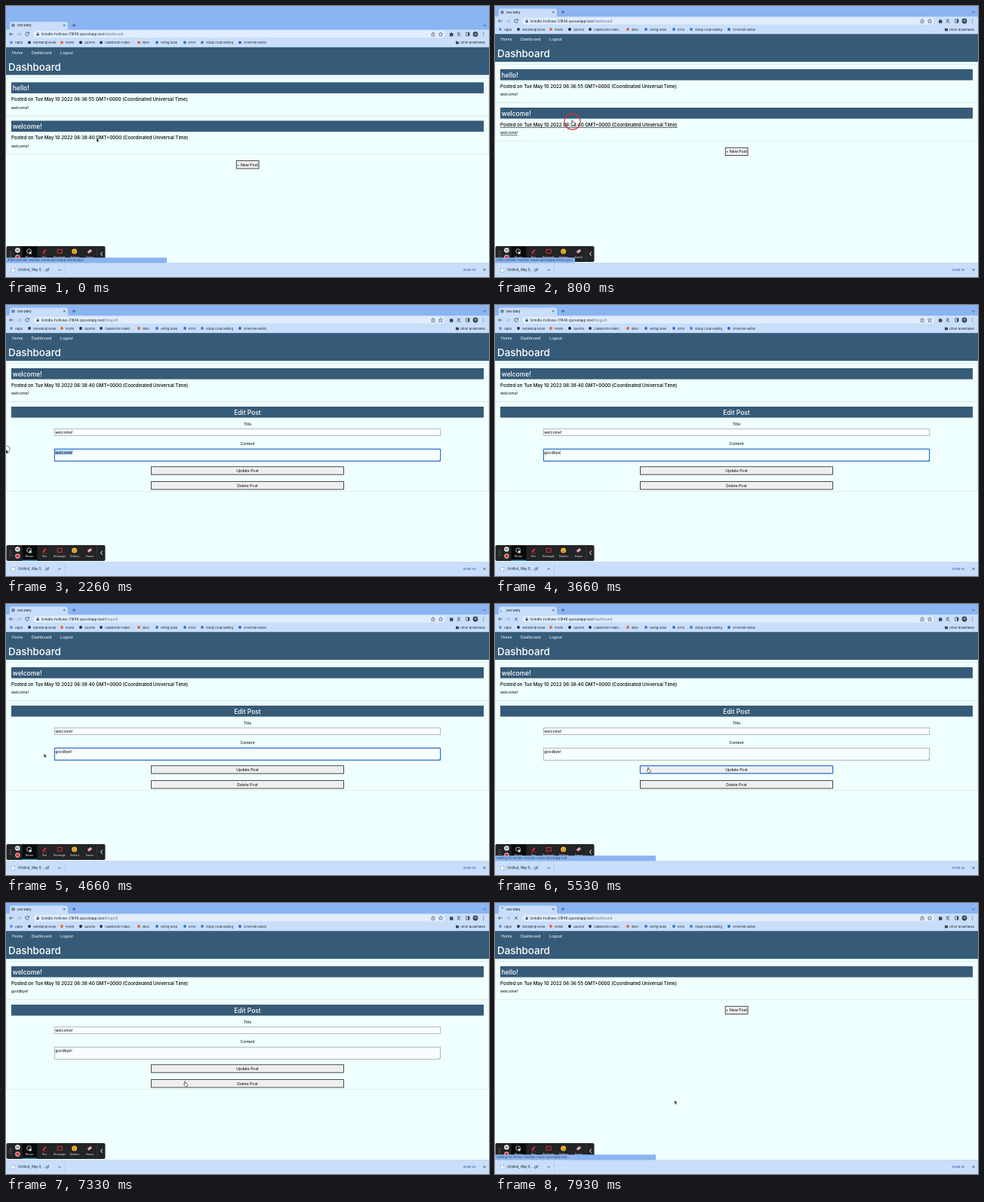
These frames come from a looping animation (640 px wide and 360 px high, 8 s). An HTML page:

```html
<!DOCTYPE html>
<html lang="en">
<head>
<meta charset="utf-8">
<title>Dashboard</title>
<style>
html, body { margin: 0; width: 100%; height: 100%; overflow: hidden; background: #f0ffff; }
svg { display: block; width: 640px; height: 360px; font-family: Inter, "Open Sans", sans-serif; }
text { white-space: pre; }
</style>
</head>
<body>
<svg id="stage" viewBox="0 0 640 360"></svg>
<script>
const LOOP = 8000;
const NAVY = '#365b78', FRAME = '#8ab4f2', BAR = '#c8defa', INK = '#3c4655', PAGE = '#f0ffff';
const HOST = 'brindle-hollows-31846.quovelapp.test';
const stage = document.getElementById('stage');

const rect = (x, y, w, h, fill, more = '') =>
  `<rect x="${x}" y="${y}" width="${w}" height="${h}" fill="${fill}" ${more}/>`;
const dot = (x, y, r, fill, more = '') => `<circle cx="${x}" cy="${y}" r="${r}" fill="${fill}" ${more}/>`;
const line = (d, color = INK, w = 0.8, more = '') =>
  `<path d="${d}" fill="none" stroke="${color}" stroke-width="${w}" ${more}/>`;
// y is the middle of the capitals
const text = (x, y, size, str, more = '') =>
  `<text x="${x}" y="${y + size * 0.36}" font-size="${size}" ${more}>${str}</text>`;
const mid = (y, size, str, more = '') => text(320, y, size, str, 'text-anchor="middle" ' + more);
const cross = (x, y, r) => line(`M${x - r} ${y - r}l${2 * r} ${2 * r}m0 ${-2 * r}l${-2 * r} ${2 * r}`);
const within = (t, a, b) => t >= a && t < b;
const ease = p => { p = Math.min(1, Math.max(0, p)); return p * p * (3 - 2 * p); };

// ---- browser chrome ----
const BOOKMARKS = [
  [12, 'Apps', '#5b8def'], [36, 'Workshop Nook', '#26324a'], [79, 'Plovix', '#e8662c'],
  [104, 'Quorno', '#1b1f23'], [131, 'Classroom Folder...', '#26324a'], [181, 'libvo', '#d9643a'],
  [205, 'Hiring Desk', '#3472c8'], [242, 'Error', '#3472c8'], [265, 'Study Code Mixing', '#4a78b8'],
  [315, 'STARTER Notes', '#2c63c4']
];

function chrome(path, loading, t) {
  const a = t * 0.36;
  let s = rect(0, -20, 640, 35, FRAME) + rect(0, 14, 640, 23.2, BAR) +
    `<path d="M2 14.5q3 0 3-3v-5q0-3 3-3h71q3 0 3 3v5q0 3 3 3z" fill="${BAR}"/>` +
    text(15, 8.2, 4, 'Dev Diary') + cross(77.3, 8.2, 1.2) + line('M90 6v4.4m-2.2-2.2h4.4') +
    line('M632.4 7.4l1.8 1.8 1.8-1.8');
  s += loading
    ? line('M9.5 5.9a2.3 2.3 0 0 1 2.3 2.3', '#2b6fd6', 0.8, `transform="rotate(${a} 9.5 8.2)"`) + cross(28, 20, 1.8)
    : dot(9.5, 8.2, 2.2, '#536579') + line('M7.4 8.2h4.2M9.5 6v4.4', BAR, 0.4) +
      line('M30 18.6a2.3 2.3 0 1 0 .2 2M30.4 17.3v1.7h-1.7');
  s += line('M9.7 20h-5m2-2.2L4.5 20l2.2 2.2') + line('M14.7 20h5m-2-2.2l2.2 2.2-2.2 2.2', '#8ea4bf') +
    rect(36, 15.4, 546, 9.2, '#e1edfd', 'rx="4.6"') +
    rect(40.6, 19.5, 3, 2.4, INK, 'rx=".4"') + line('M41.2 19.6v-.8a.9.9 0 0 1 1.8 0v.8', INK, 0.5) +
    text(47, 20, 4.65, `${HOST}<tspan fill="#66758a">${path}</tspan>`, 'fill="#1d2530"') +
    line('M564.8 19h-.8v3.4h4V19h-.8M566 21v-3.6m-1.2 1.2l1.2-1.2 1.2 1.2', INK, 0.6) +
    line('M576 17.3l.8 1.8 2 .2-1.5 1.3.4 2-1.7-1-1.7 1 .4-2-1.5-1.3 2-.2z', INK, 0.6) +
    `<path d="M588 18.6h1.2a1 1 0 0 1 1.9 0h1.2v1.3a1 1 0 0 1 0 1.7v1.2H588z" fill="${INK}"/>` +
    line('M598 18.4h4m-4 1.7h3m-3 1.7h2m1.6-1v2') +
    rect(609.6, 17.8, 4.4, 4.4, 'none', `rx=".5" stroke="${INK}" stroke-width=".7"`) +
    rect(612, 17.8, 2, 4.4, INK) +
    dot(622, 20, 3.4, '#34454f') + text(622, 20, 3.4, 'M', 'fill="#fff" text-anchor="middle"') +
    [18, 20, 22].map(y => dot(632.5, y, 0.5, INK)).join('');
  for (const [x, name, color] of BOOKMARKS)
    s += dot(x - 5, 31, 1.9, color) + text(x, 31.2, 4, name, 'fill="#1d2530"');
  return s + `<path d="M596 29.4h1.6l.5.6h2v3.2H596z" fill="${INK}"/>` + text(602, 31.2, 4, 'Other Bookmarks', 'fill="#1d2530"');
}

// ---- web page ----
const header = () => rect(0, 37, 640, 37.2, NAVY) +
  text(8, 44.5, 5.15, 'Home', 'fill="#fff"') + text(34, 44.5, 5.15, 'Dashboard', 'fill="#fff"') +
  text(72, 44.5, 5.15, 'Logout', 'fill="#fff"') +
  text(3, 63.4, 13.4, 'Dashboard', 'fill="#fff" font-weight="500"');

const card = (y, h) => rect(0.25, y, 639.5, h, 'none', 'stroke="#cfdfe2" stroke-width=".5"') +
  rect(7, y + 6.2, 626, 14.6, NAVY);

function post(y, title, time, body, hover) {
  const deco = hover ? 'text-decoration="underline"' : '';
  return card(y, 50.8) +
    text(8.8, y + 13.7, 8.45, title, 'fill="#fff" font-weight="500"') +
    text(7, y + 28.9, 6.18, `Posted on Tue May 10 2022 ${time} GMT+0000 (Coordinated Universal Time)`, 'font-weight="500" ' + deco) +
    text(7, y + 39.8, 5.1, body, deco);
}

const button = (x, y, w, label, focus) =>
  rect(x, y, w, 10.4, '#efefef', focus ? 'stroke="#2d6fd2" stroke-width="1.2" rx=".6"' : 'stroke="#222" stroke-width=".8"') +
  mid(y + 5.3, 5.1, label);

function dashboard(body, hover) {
  const n = body ? 2 : 1;
  return post(77.8, 'hello!', '06:36:55', 'welcome!') +
    (body ? post(128.8, 'welcome!', '06:38:40', body, hover) : '') +
    button(305.2, 137.2 + (n - 1) * 51, 29.8, '+ New Post');
}

function editor(body, form) {
  const area = form.focus ? 'stroke="#2d6fd2" stroke-width="1.2" rx=".6"' : 'stroke="#858c90" stroke-width=".6"';
  return post(77.8, 'welcome!', '06:38:40', body) + card(128.8, 118.6) +
    mid(142.7, 8.45, 'Edit Post', 'fill="#fff" font-weight="500"') +
    mid(157.8, 5.1, 'Title') +
    rect(64.2, 164.8, 511.6, 8.8, '#fafeff', 'stroke="#858c90" stroke-width=".6"') + text(65.2, 169.2, 5.1, 'welcome!') +
    mid(184.4, 5.1, 'Content') +
    rect(64.4, 191.4, 511.2, 16, '#f7feff', area) + line('M573 207l2.4-2.4m-1 2.4l1-1', '#777', 0.4) +
    (form.selectFrom < 88 ? rect(form.selectFrom, 192.8, 88 - form.selectFrom, 6, '#a3cbf5') : '') +
    text(65.2, 195.7, 5.1, form.value + (form.caret ? '<tspan font-weight="300" dx="-.8">|</tspan>' : '')) +
    button(192.4, 214.8, 255.2, 'Update Post', form.update) +
    button(192.4, 234.6, 255.2, 'Delete Post', form.remove);
}

// ---- fixed parts at the bottom ----
const TOOLS = [['Mouse', 31], ['Pen', 51], ['Rectangle', 71], ['Stickers', 91], ['Eraser', 111]];
const recorder = rect(0.5, 319, 131, 21, '#222426', 'rx="2"') + rect(21.5, 319.5, 20, 20, '#08090a') +
  rect(21.5, 338.6, 20, 1.2, '#2b9cf0') +
  [326.5, 329.5, 332.5].map(y => dot(5.2, y, 0.5, '#aaa') + dot(7, y, 0.5, '#aaa')).join('') +
  dot(15.4, 324.4, 3.2, '#f4f4f4') + line('M14.5 323v2.8m1.8-2.8v2.8', '#222', 0.8) +
  dot(15.4, 333.6, 3.1, '#f4f4f4') + dot(15.4, 333.6, 2.4, '#d8302f') +
  dot(30.6, 325.8, 2.9, 'none', 'stroke="#eee" stroke-width=".8"') +
  '<path d="M30.6 325.6l4 3-1.9.3-.9 1.6z" fill="#fff"/>' +
  line('M49 328.5l3.8-4.6', '#e02b33', 2) + line('M48 329.8h6', '#e02b33', 0.5) +
  rect(68.2, 323.4, 6, 5, 'none', 'stroke="#e02b33" stroke-width="1"') +
  dot(90.6, 326, 3.5, '#f5b82e') + dot(89.4, 325.2, 0.5, '#543') + dot(91.8, 325.2, 0.5, '#543') +
  line('M88.8 327q1.8 2 3.6 0', '#543', 0.6) +
  rect(108.2, 324.2, 5.6, 3.4, '#e9a1ad', 'rx=".6" transform="rotate(-35 111 326)"') +
  TOOLS.map(([name, x]) => text(x, 333.4, 3.3, name, 'fill="#eee" text-anchor="middle"')).join('') +
  rect(120.6, 319.5, 0.5, 20, '#4a4d50') + line('M127.6 326.6l-2 2.6 2 2.6', '#fff', 1);

const shelf = rect(0, 341.4, 640, 18.6, BAR) + rect(0, 341.4, 640, 0.4, '#a9c1df') +
  rect(7.8, 348.4, 4, 5, '#fff', 'stroke="#8a97a8" stroke-width=".5"') +
  text(16, 350.8, 4.15, 'Untitled_ May 9,....gif', 'fill="#1d2530"') +
  line('M69.5 351.5l1.6-1.6 1.6 1.6') + rect(78.6, 344.5, 0.4, 12.5, '#97b0d0') +
  text(614, 350.4, 4.1, 'Show All', 'fill="#2458a8" text-anchor="middle"') + cross(634, 350.5, 1.4);

const status = (w, str) => rect(-1, 334.2, w + 1, 7.6, FRAME, 'rx="1"') + text(2, 338, 4, str, `fill="${INK}"`);

// ---- pointer ----
const PATH = [
  [0, 120, 175.5], [150, 120, 175], [650, 102.5, 153.5], [1060, 102.5, 153.5], [1600, 88.5, 196],
  [1750, 88.5, 196], [2200, 0, 192], [4450, 0, 192], [5100, 203, 219], [5650, 203, 219],
  [6400, 73.6, 156.5], [6850, 73.6, 156.5], [7350, 238, 239], [7650, 238, 239], [7900, 238, 262], [LOOP, 238, 262]
];
// click rings: start, end, radius, colour
const RINGS = [
  [700, 950, 10.6, '#d8323a'], [1750, 2330, 5, '#8b8f96'], [5250, 5450, 10.6, '#d8323a'],
  [6520, 6750, 10.6, '#d8323a'], [7480, 7650, 10.6, '#d8323a']
];

function pointerAt(t) {
  const i = PATH.findIndex(k => k[0] > t), [t0, x0, y0] = PATH[i - 1], [t1, x1, y1] = PATH[i];
  const p = ease((t - t0) / (t1 - t0));
  return [x0 + (x1 - x0) * p, y0 + (y1 - y0) * p];
}

function pointer(t, x, y) {
  if (within(t, 2600, 4450)) return '';
  const hand = within(t, 450, 1150) || within(t, 5000, 5750) || within(t, 6200, 6950) || within(t, 7300, 7680);
  let s = '';
  for (const [a, b, r, color] of RINGS)
    if (within(t, a, b)) s += dot(x, y, r * Math.min(1, 0.5 + (t - a) / 140), 'none', `stroke="${color}" stroke-width="1.1"`);
  const shape = hand
    ? '<path d="M-.6-1.6q.7-.7 1.2 0V1l2.2.6q.8.3.6 1.2L3 5H.2L-1.9 2.2q.3-.9 1.3-.2z" fill="#fff" stroke="#222" stroke-width=".6"/>'
    : '<path d="M0 0v5.2l1.2-1.1.8 1.8.9-.4-.8-1.7h1.7z" fill="#111" stroke="#fff" stroke-width=".4"/>';
  return s + `<g transform="translate(${x.toFixed(2)} ${y.toFixed(2)})">${shape}</g>`;
}

// ---- scene ----
function draw(t) {
  const [x, y] = pointerAt(t);
  const shift = 17.4 * (1 - ease((t - 60) / 340));
  const typed = 'goodbye!'.slice(0, Math.max(0, Math.floor((t - 2700) / 150) + 1));
  const second = t >= 6850;
  const editing = within(t, 1000, 5650) || within(t, 6850, 7730);
  const loading = within(t, 5350, 5720) || t >= 7600;
  const onDash = !editing || loading;

  const page = editing
    ? editor(second ? 'goodbye!' : 'welcome!', {
        value: second ? 'goodbye!' : typed || 'welcome!',
        focus: within(t, 1750, 5250),
        caret: within(t, 2700, 5250) && (t < 3900 || t % 1000 < 500),
        selectFrom: within(t, 1750, 2700) ? Math.max(65, x) : 88,
        update: within(t, 5250, 5650),
        remove: within(t, 7480, 7730)
      })
    : dashboard(t < 1000 ? 'welcome!' : t < 7000 ? 'goodbye!' : '', within(t, 450, 1000) || within(t, 6300, 6850));

  let bubble = '';
  if (t < 1000) bubble = status(t < 400 ? 213 : 106, `https://${HOST}/blogs/6`);
  else if (loading) bubble = status(213, `Waiting for ${HOST}...`);

  return rect(0, 0, 640, 360, PAGE) +
    `<g transform="translate(0 ${shift.toFixed(2)})">${page}${header()}${chrome(onDash ? '/dashboard' : '/blogs/6', loading, t)}</g>` +
    recorder + bubble + shelf + pointer(t, x, y);
}

const start = performance.now();
function tick() {
  stage.innerHTML = draw((performance.now() - start) % LOOP);
  requestAnimationFrame(tick);
}
tick();
</script>
</body>
</html>
```
